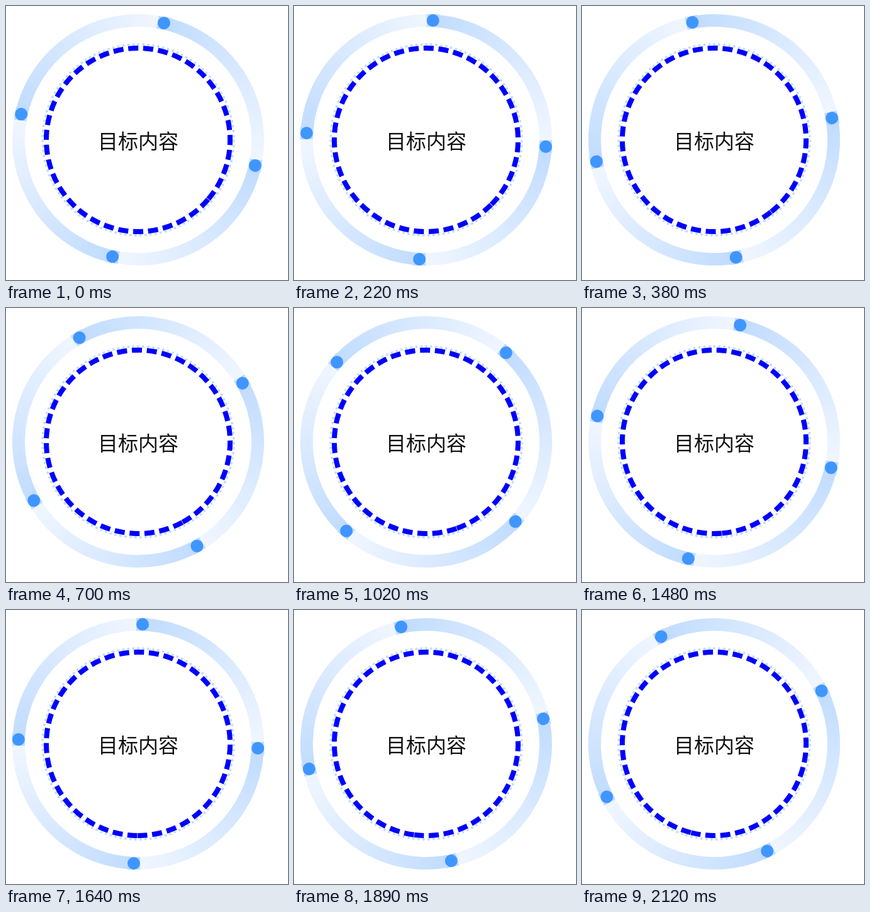
An HTML page with a canvas that plays this animation: 448 px wide and 436 px high, repeating every 2210 ms.

```html
<!DOCTYPE html>
<html lang="zh-CN">
<head>
<meta charset="utf-8">
<style>
html, body { margin: 0; width: 100%; height: 100%; overflow: hidden; background: #fff; }
canvas { display: block; }
</style>
</head>
<body>
<canvas id="stage" width="448" height="436"></canvas>
<script>
const ctx = document.getElementById('stage').getContext('2d');
const CX = 210, CY = 213, TAU = 2 * Math.PI;
const DARK = '#bfdbff', LIGHT = '#f0f6ff';

// The motion advances in uneven steps; lengths in units of 10 ms.
const steps = [...'7978779797979797797979797979'].map(Number);
const LOOP = 2210;
// [step, degrees turned by the outer ring since the loop began]
const keys = [[0, 0], [5, 22.9], [9, 41.8], [13, 60.6], [17, 79.5], [21, 100.3], [27, 128.7]];
const START = 260.6;

const rad = deg => deg * Math.PI / 180;

function stepAt(ms) {
  let i = 0, end = steps[0] * 10;
  while (ms >= end && i < steps.length - 1) end += steps[++i] * 10;
  return i;
}

function turned(step) {
  const k = Math.max(1, keys.findIndex(key => key[0] >= step));
  const [s0, a0] = keys[k - 1], [s1, a1] = keys[k];
  return START + a0 + (a1 - a0) * (step - s0) / (s1 - s0);
}

function rotated(deg, paint) {
  ctx.save();
  ctx.translate(CX, CY);
  ctx.rotate(rad(deg));
  paint();
  ctx.restore();
}

function ring(radius, width, color, dash = [], cap = 'butt') {
  ctx.beginPath();
  ctx.arc(0, 0, radius, 0, TAU);
  ctx.lineWidth = width;
  ctx.strokeStyle = color;
  ctx.setLineDash(dash);
  ctx.lineCap = cap;
  ctx.stroke();
}

function outerRing() {
  const fade = ctx.createConicGradient(0, 0, 0);
  for (let q = 0; q < 4; q++) {
    fade.addColorStop(q / 4, DARK);
    fade.addColorStop((q + 1) / 4, LIGHT);
  }
  ring(190, 20, fade);
  for (let q = 0; q < 4; q++) {
    ctx.fillStyle = DARK;
    ctx.fillRect(0, -200, 20, 20);
    ctx.fillStyle = '#4096ff';
    ctx.beginPath();
    ctx.arc(10, -190, 10, 0, TAU);
    ctx.fill();
    ctx.rotate(TAU / 4);
  }
}

// 39 dashes and 38 gaps: the first and last dash meet at a thin seam.
function dashedRing() {
  ring(146, 8, '#00f', [16, (TAU * 146 - 39 * 16) / 38]);
  ctx.fillStyle = '#fff';
  ctx.fillRect(141, -0.35, 10, 0.7);
}

function draw(now) {
  const angle = turned(stepAt(now % LOOP));
  ctx.fillStyle = '#fff';
  ctx.fillRect(0, 0, 448, 436);
  rotated(-angle, outerRing);
  rotated(-90, () => ring(152, 4, DARK, [0, TAU * 152 / 119], 'round'));
  rotated(angle / 2 - 90, dashedRing);
  ctx.fillStyle = '#111';
  ctx.font = '32px "Noto Sans CJK SC", "Noto Sans CJK", sans-serif';
  ctx.textAlign = 'center';
  ctx.fillText('目标内容', CX, 227);
}

const origin = performance.now();
function tick() {
  draw(performance.now() - origin);
  requestAnimationFrame(tick);
}
tick();
</script>
</body>
</html>
```
